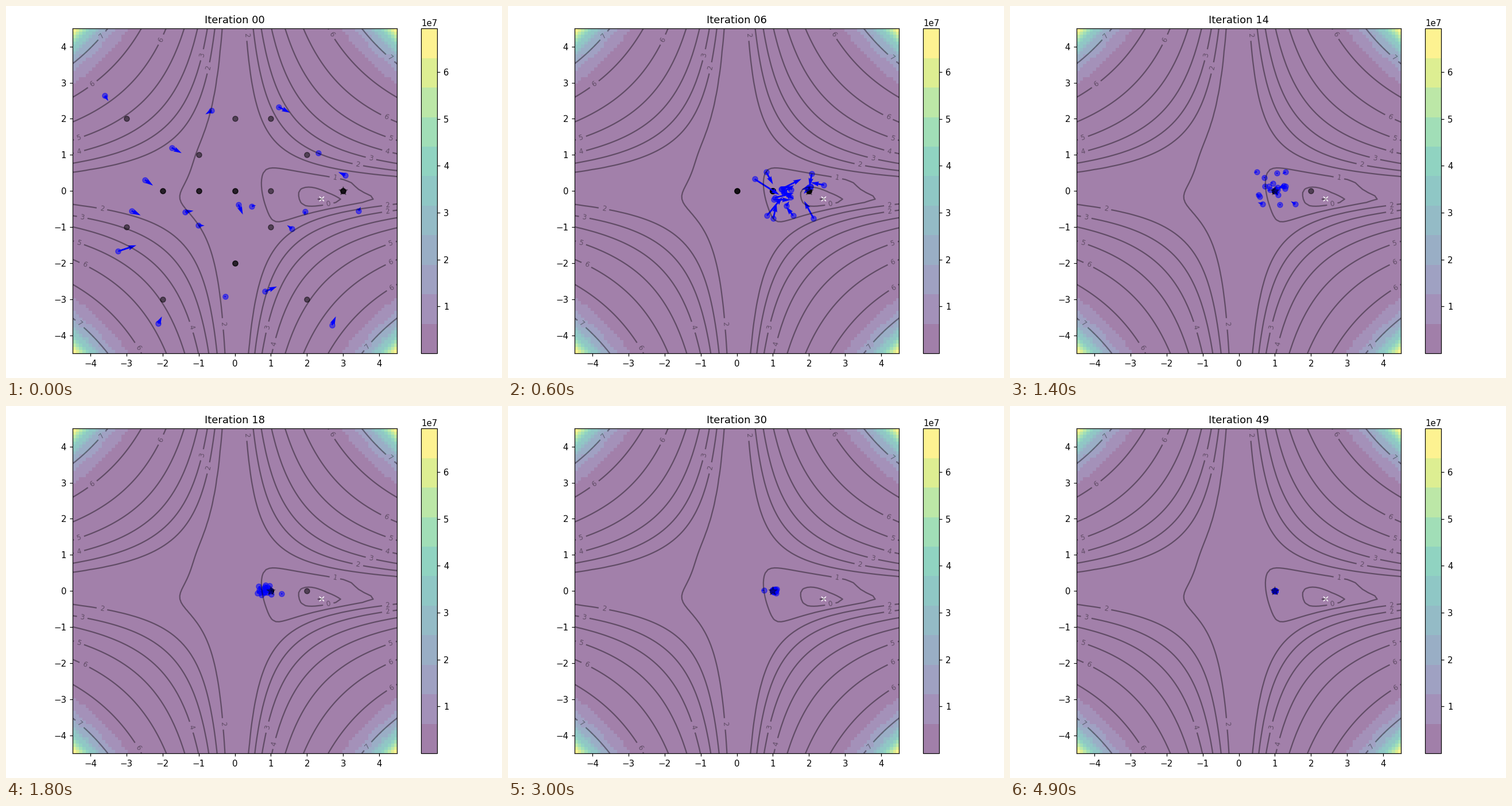
A matplotlib script for the animation above (5000 ms loop, 864 by 648 pixels).

```python
import matplotlib.pyplot as plt
import numpy as np
from matplotlib.animation import FuncAnimation

FRAMES, INTERVAL = 50, 100
LIMIT = 4.5
PARTICLES = 20
INERTIA, OWN_PULL, SHARED_PULL = 0.8, 0.1, 0.1


def objective(x, y):
    p = x * y
    return (1.5 - x - p)**2 + (2.25 - x + p**2)**2 + (2.625 - x + p**3)**2


def scatter_start(rng):
    """Spread the swarm over the stage, denser along the middle row."""
    k = np.arange(PARTICLES)
    x = np.linspace(3.43, -3.6, PARTICLES)
    y = -0.55 + 3.2 * np.sin(2.4 * k)**3
    pos = np.column_stack([x, y])
    vel = 0.05 * ([3, 0] - pos) + rng.normal(0, 0.12, pos.shape)
    return pos, vel


def simulate():
    """Swarm, velocities, personal bests and global best for each step.

    Bests are remembered as whole-numbered cells.
    """
    rng = np.random.RandomState(100)
    weights = rng.rand(FRAMES, 2) * [OWN_PULL, SHARED_PULL]
    pos, vel = scatter_start(rng)
    best = np.trunc(pos)
    best_value = objective(*best.T)
    steps = []
    for own, shared in weights:
        top = best[best_value.argmin()]
        steps.append((pos, vel, best, top))
        vel = INERTIA * vel + own * (best - pos) + shared * (top - pos)
        pos = pos + vel
        value = objective(*pos.T)
        better = value < best_value
        best = np.where(better[:, None], np.trunc(pos), best)
        best_value = np.minimum(value, best_value)
    return steps


steps = simulate()
axis = np.linspace(-LIMIT, LIMIT, 100)
x, y = np.meshgrid(axis, axis)
z = objective(x, y)
lowest = z.argmin()

fig, ax = plt.subplots(figsize=(8, 6), dpi=108)
img = ax.imshow(z, extent=[-LIMIT, LIMIT] * 2, origin="lower",
                cmap=plt.get_cmap("viridis", 11), alpha=0.5)
fig.colorbar(img, ax=ax)
ax.plot([x.flat[lowest]], [y.flat[lowest]], marker="x", markersize=5, color="white")
contours = ax.contour(x, y, np.log10(z), 10, colors="black", alpha=0.4)
ax.clabel(contours, inline=True, fontsize=8, fmt="%.0f")

pos, vel, best, top = steps[0]
best_dots = ax.scatter(*best.T, marker="o", color="black", alpha=0.5)
dots = ax.scatter(*pos.T, marker="o", color="blue", alpha=0.5)
arrows = ax.quiver(*pos.T, *vel.T, color="blue", width=0.005,
                   angles="xy", scale_units="xy", scale=1)
star = ax.scatter(*top, marker="*", s=100, color="black", alpha=0.4)
ax.set_xlim(-LIMIT, LIMIT)
ax.set_ylim(-LIMIT, LIMIT)
# Labels keep the places chosen before the margins are tightened.
fig.subplots_adjust(left=0.01875, right=0.98125, bottom=0.0662, top=0.9394)


def draw(i):
    pos, vel, best, top = steps[i]
    ax.set_title(f"Iteration {i:02d}")
    best_dots.set_offsets(best)
    dots.set_offsets(pos)
    arrows.set_offsets(pos)
    arrows.set_UVC(*vel.T)
    star.set_offsets([top])
    return best_dots, dots, arrows, star


anim = FuncAnimation(fig, draw, frames=FRAMES, interval=INTERVAL,
                     repeat=True, repeat_delay=0)
plt.show()
```
